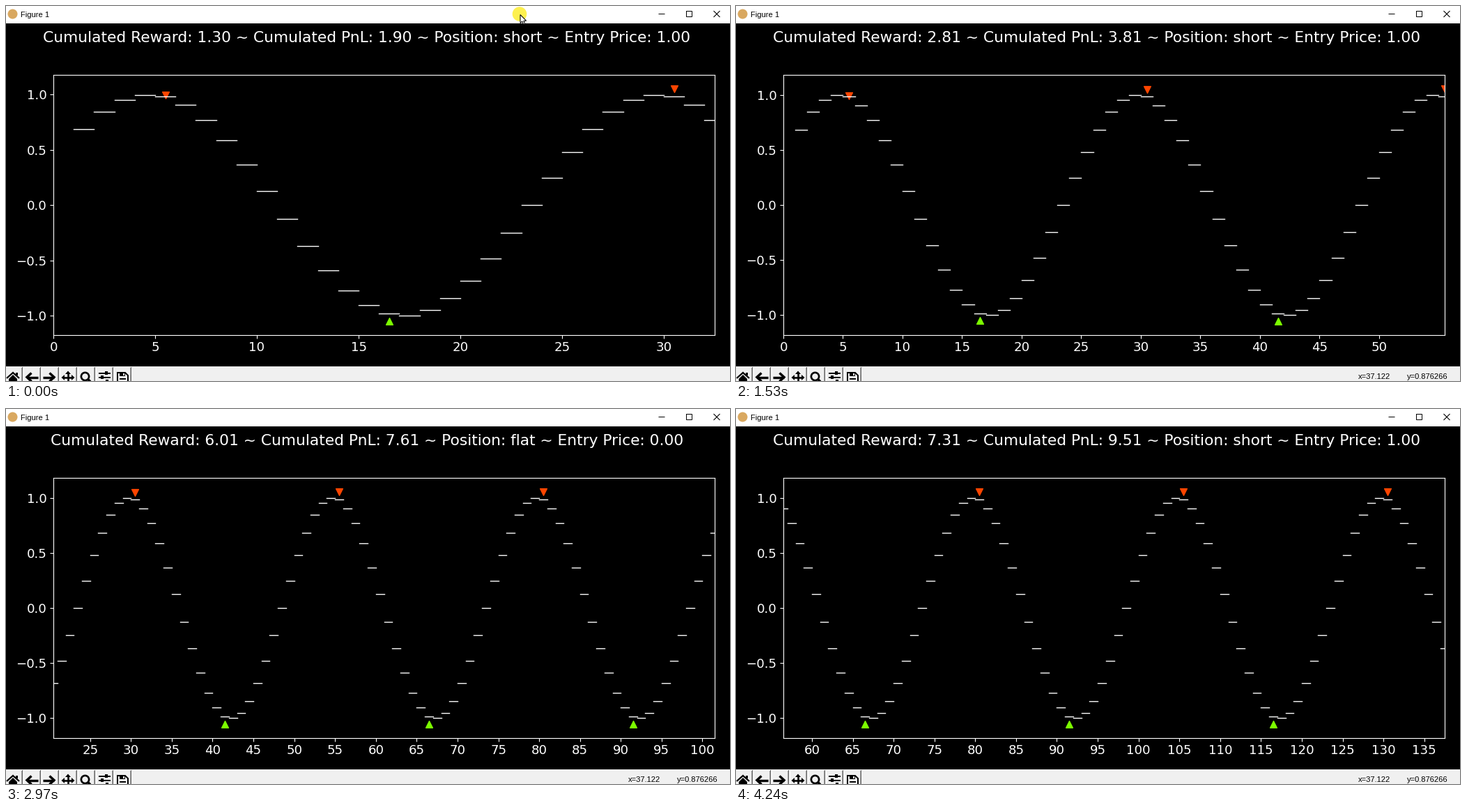
A matplotlib script that plays this animation: 1039 by 539 pixels, repeating every 4260 ms.

```python
import math
import numpy as np
import matplotlib.pyplot as plt
from matplotlib.animation import FuncAnimation
from matplotlib.collections import LineCollection
from matplotlib.patches import Circle, Polygon, Rectangle
from matplotlib.ticker import MultipleLocator

W, H, DPI = 1039, 539, 100
LOOP, STEP_MS = 4260, 20
PERIOD, SELL, BUY = 25, 5, 16     # wave length in bars, bars that trade
FIRST, LAST, WINDOW = 32, 140, 80.5
FEE = 0.2
SLOW_BAR, RUN_START = 140, 1117   # ms per bar at first, then the fast run
CURSOR_HOLD, LABEL_MS, CURSOR_END = 130, 780, 980

plt.rcParams.update({"font.family": "DejaVu Sans", "toolbar": "None"})


def price(bar):
    return math.sin(2 * math.pi * (bar + 2) / PERIOD)


def newest_bar(t):
    if t < RUN_START:
        return FIRST + int(t / SLOW_BAR)
    # every bar takes a little longer: k bars last a*k + b*k^2 ms
    a, b = 26.6, 0.0563
    k = (math.sqrt(a * a + 4 * b * (t - RUN_START)) - a) / (2 * b)
    return FIRST + RUN_START // SLOW_BAR + 1 + int(k)


def trade(last):
    """Place the trade markers and follow the growing vertical range."""
    low = high = price(1)
    marks = {"v": [], "^": []}
    limits = [(low, high)]
    for bar in range(1, last + 1):
        low, high = min(low, price(bar)), max(high, price(bar))
        if bar % PERIOD in (SELL, BUY):
            side, marker = (1, "v") if bar % PERIOD == SELL else (-1, "^")
            y = price(bar) + side * 0.03 * 1.1 * (high - low)
            marks[marker].append((bar + 0.5, y))
            edge = y + side * 0.018
            low, high = min(low, edge), max(high, edge)
        margin = 0.05 * (high - low)
        limits.append((low - margin, high + margin))
    return marks, limits


def headline(bar):
    entries = (bar - SELL) // PERIOD + 1
    exits = (bar - BUY) // PERIOD + 1
    entry, leave = price(SELL - 1), price(BUY - 1)
    pnl = exits * (entry - leave)
    reward = pnl - FEE * (entries + exits)
    short = entries > exits
    return (f"Cumulated Reward: {reward:.2f} ~ Cumulated PnL: {pnl:.2f} ~ "
            f"Position: {'short' if short else 'flat'} ~ "
            f"Entry Price: {entry if short else 0:.2f}")


fig = plt.figure(figsize=(W / DPI, H / DPI), dpi=DPI, facecolor="black")

# Price chart
left, right, top, bottom = 68, 1017, 99.4, 472.6
ax = fig.add_axes([left / W, 1 - bottom / H, (right - left) / W,
                   (bottom - top) / H], facecolor="black")
ax.tick_params(colors="white", labelsize=13.06)
ax.yaxis.set_major_locator(MultipleLocator(0.5))
for spine in ax.spines.values():
    spine.set_color("white")

marks, limits = trade(LAST)
ax.add_collection(LineCollection(
    [[(b, price(b)), (b + 1, price(b))] for b in range(1, LAST)],
    colors="white", linewidths=1, capstyle="projecting", zorder=2))
for marker, color in (("v", "orangered"), ("^", "lawngreen")):
    ax.scatter(*zip(*marks[marker]), s=50, color=color, marker=marker,
               zorder=1)

title = fig.text(518 / W, 1 - 52 / H, "", color="white", size=15.67,
                 ha="center", va="baseline")

# Window frame, in pixels from the top left corner
win = fig.add_axes([0, 0, 1, 1], zorder=2)
win.set_xlim(0, W)
win.set_ylim(H, 0)
win.axis("off")


def box(x, y, w, h, color="black", z=1):
    win.add_patch(Rectangle((x, y), w, h, fc=color, ec="none", zorder=z))


def shape(points):
    win.add_patch(Polygon(points, fc="black", ec="none", zorder=3))


def stroke(xs, ys, px=1.0):
    win.plot(xs, ys, color="black", lw=px * 72 / DPI, zorder=3,
             solid_capstyle="butt", solid_joinstyle="miter")


def small_text(x, y, text):
    return win.text(x, y, text, family="Liberation Sans", size=8,
                    color="black", va="baseline", zorder=4)


def arrow_icon(x, y, way):
    stroke([x - way * 7, x + way * 9], [y, y], 3.4)
    stroke([x - way * 0.5, x - way * 7, x - way * 0.5], [y - 6, y, y + 6], 3.4)


def move_icon(x, y):
    stroke([x - 7, x + 7], [y, y], 2.6)
    stroke([x, x], [y - 7, y + 7], 2.6)
    for dx, dy in ((1, 0), (-1, 0), (0, 1), (0, -1)):
        shape([(x + 9.5 * dx, y + 9.5 * dy),
               (x + 5 * dx + 4 * dy, y + 5 * dy + 4 * dx),
               (x + 5 * dx - 4 * dy, y + 5 * dy - 4 * dx)])


def home_icon(x, y):
    stroke([x - 9, x, x + 9], [y + 9, y + 1, y + 9], 2.2)
    shape([(x, y + 4), (x - 6, y + 10), (x - 6, H), (x + 6, H),
           (x + 6, y + 10)])
    box(x + 4, y + 1, 2.5, 4, z=3)


def slider_icon(x, y):
    for row, knob in enumerate((11, 5, 12)):
        mid = y + 6 * row
        stroke([x, x + 17], [mid, mid], 2)
        box(x + knob - 1.7, mid - 2.5, 3.4, 5, z=3)


def disk_icon(x, y):
    stroke([x, x, x + 11, x + 15, x + 15], [H, y, y, y + 4, H], 2)
    box(x + 3, y, 8, 5, z=3)
    box(x + 7.5, y + 1, 2, 3, "#f0f0f0", z=4)
    box(x + 3, y + 8, 9, 2, z=3)


# Title bar
box(0, 0, W, 25, "white")
win.add_patch(Circle((9.5, 11.5), 7, fc="#d9a860", ec="none"))
small_text(21, 16, "Figure 1")
stroke([936, 945], [11, 11])
stroke([976, 984, 984, 976, 976], [7, 7, 15, 15, 7])
stroke([1015.5, 1024.5], [7, 16], 1.1)
stroke([1015.5, 1024.5], [16, 7], 1.1)

# Toolbar with its cut-off buttons
box(0, 518, W, 21, "#f0f0f0")
for x in range(23, 180, 26):
    box(x - 24, 519, 23, 1, "white")
    box(x - 24, 519, 1, 20, "white")
    box(x, 519, 1, 20, "#696969")
    box(x - 1, 520, 1, 19, "#a0a0a0")

home_icon(10, 526)
arrow_icon(37, 533.5, 1)
arrow_icon(62, 533.5, -1)
move_icon(89, 534)
win.add_patch(Circle((113.5, 532.5), 5.6, fc="none", ec="black",
                     lw=1.9, zorder=3))
stroke([117, 123], [536, 542], 3.6)
slider_icon(133, 527.5)
disk_icon(160, 527)

readout = [small_text(893, 536.5, "x=37.122"),
           small_text(963, 536.5, "y=0.876266")]

# Mouse pointer with its halo
ARROW = np.array([(0, 0), (0, 12), (2.8, 9.6), (4.8, 14), (6.8, 13.1),
                  (4.9, 8.9), (8.6, 8.7)])
START, END = np.array([737, 11.5]), np.array([1008, 147])
halo = Circle(START, 10.3, fc="#fdf04f", ec="none", zorder=8)
pointer = Polygon(ARROW, fc="white", ec="black", lw=0.75, zorder=9)
win.add_patch(halo)
win.add_patch(pointer)


def update(i):
    t = i * STEP_MS + STEP_MS / 2
    bar = newest_bar(t)
    start = max(0, bar - WINDOW)
    # the axis label of a bar follows one bar later
    ax.set_xticks(range(5 * math.ceil(start / 5), bar, 5))
    ax.set_xlim(start, bar + 0.5)
    ax.set_ylim(*limits[bar])
    title.set_text(headline(bar))
    for text in readout:
        text.set_visible(t >= LABEL_MS)

    travel = min(t // CURSOR_HOLD * CURSOR_HOLD / LABEL_MS, 1)
    spot = START + (END - START) * travel
    halo.center = tuple(spot)
    pointer.set_xy(ARROW + spot + 1)
    for part in (halo, pointer):
        part.set_visible(t < CURSOR_END)
    return []


anim = FuncAnimation(fig, update, frames=LOOP // STEP_MS, interval=STEP_MS,
                     init_func=lambda: update(0), repeat=True, repeat_delay=0,
                     cache_frame_data=False)
plt.show()
```
